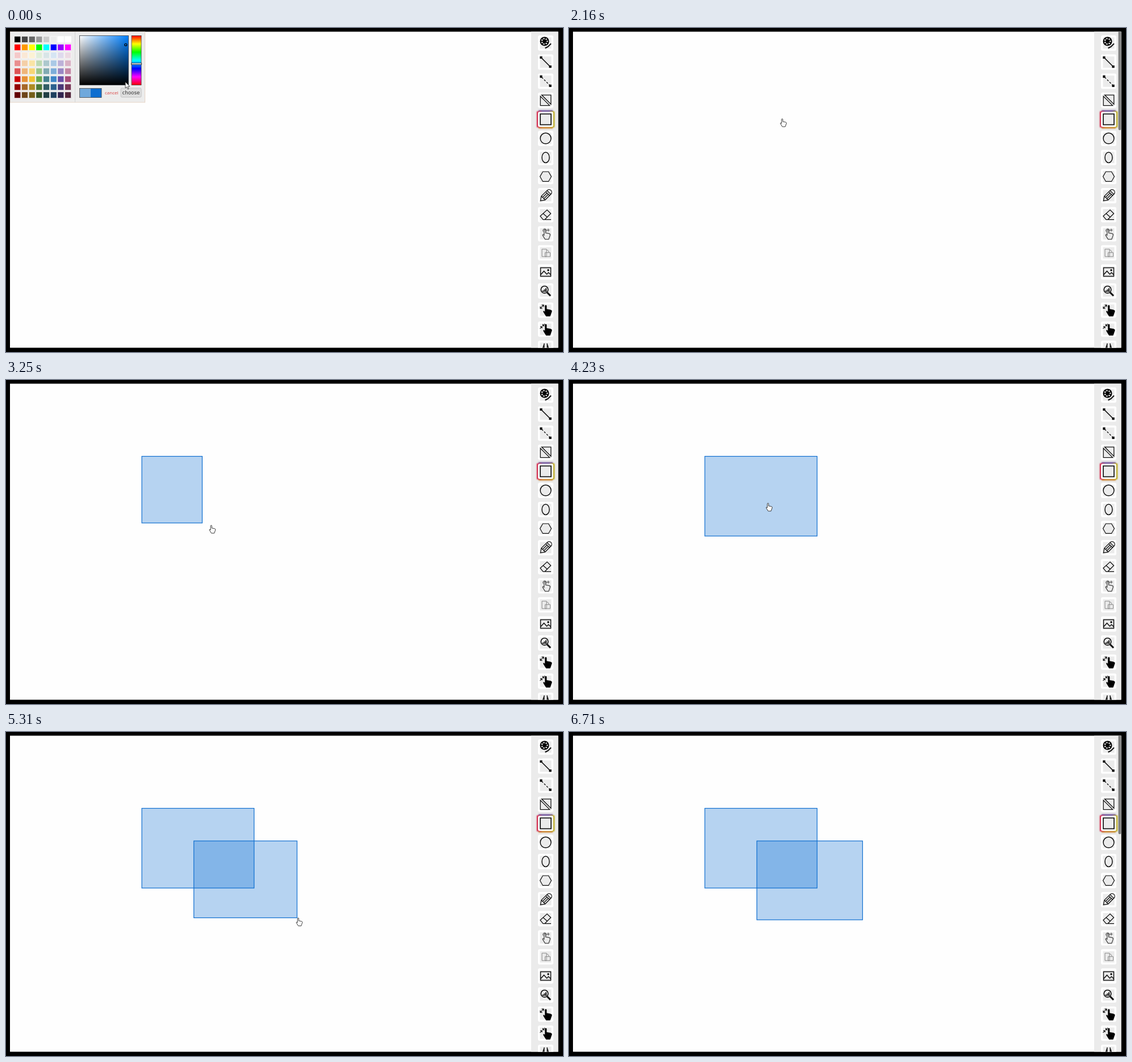
These frames come from a looping animation (980 px wide and 571 px high, 6980 ms). An HTML page:

```html
<!DOCTYPE html>
<html>
<head>
<meta charset="utf-8">
<style>
html, body { margin: 0; width: 100%; height: 100%; overflow: hidden; background: #000; }
svg { display: block; }
.icon { fill: none; stroke: #111; stroke-width: 1.5; }
.icon .solid { fill: #000; stroke: none; }
.icon .light { fill: #ebebeb; stroke: none; }
.icon .thin { stroke-width: 1; stroke: #444; }
.icon .pale { stroke-width: 1; stroke: #888; }
.shape { fill-opacity: .3; fill: rgb(14,110,208); stroke: rgb(14,110,208); stroke-width: 1.2; }
.glow rect { filter: blur(1.3px); }
.frame { fill: none; stroke: #444; stroke-width: .8; }
</style>
</head>
<body>
<svg width="980" height="571" viewBox="0 0 980 571">
  <defs>
    <linearGradient id="white"><stop stop-color="#fff"/><stop offset="1" stop-color="#fff" stop-opacity="0"/></linearGradient>
    <linearGradient id="black" x2="0" y2="1"><stop stop-opacity="0"/><stop offset="1"/></linearGradient>
    <linearGradient id="hue" x2="0" y2="1"></linearGradient>
    <clipPath id="view"><rect x="7" y="6.5" width="964.5" height="557"/></clipPath>
  </defs>
  <g clip-path="url(#view)">
    <rect width="980" height="571" fill="#fefefe"/>
    <rect id="first" class="shape"/>
    <rect id="second" class="shape"/>
    <rect x="924" width="56" height="571" fill="#ebebeb"/>
    <g class="glow">
      <rect x="937" y="145" width="25" height="8" fill="#604090"/>
      <rect x="937" y="169" width="25" height="8" fill="#c87818"/>
      <rect x="934" y="147" width="8" height="28" fill="#d00830"/>
      <rect x="957" y="147" width="8" height="28" fill="#b4a000"/>
    </g>
    <g id="tools"></g>
    <rect id="bar" x="966.5" y="0" width="5" height="180" rx="2.5" fill="#808080"/>
    <g id="picker">
      <rect x="7" y="6.5" width="237.5" height="124.5" fill="#ececec" stroke="#e6d4c6"/>
      <path d="M121.5 7V131" stroke="#d4d4d4"/>
      <g id="swatches" stroke="#fff" stroke-width=".6"></g>
      <rect x="129.5" y="13.5" width="86" height="87" fill="hsl(210,100%,50%)"/>
      <rect x="129.5" y="13.5" width="86" height="87" fill="url(#white)"/>
      <rect x="129.5" y="13.5" width="86" height="87" fill="url(#black)"/>
      <rect x="129.5" y="13.5" width="86" height="87" class="frame"/>
      <circle cx="210.7" cy="29.5" r="2" fill="none" stroke="#000" stroke-width="1.2"/>
      <rect x="221" y="13.5" width="17" height="87" fill="url(#hue)"/>
      <rect x="221" y="13.5" width="17" height="87" class="frame"/>
      <rect x="220.5" y="62" width="18" height="2.4" fill="#fff" stroke="#111" stroke-width=".8"/>
      <rect x="130" y="106.5" width="19" height="16" fill="#6fa8dc"/>
      <rect x="149" y="106.5" width="19" height="16" fill="#0e6ed0"/>
      <rect x="129.5" y="106.5" width="38.5" height="16" class="frame"/>
      <text x="174" y="117" font-family="Open Sans, sans-serif" font-size="8" fill="#d93f3f">cancel</text>
      <rect x="202" y="106" width="36" height="16" rx="2" fill="#dedede" stroke="#bbb" stroke-width=".8"/>
      <text x="204.5" y="116.7" font-family="DejaVu Sans, sans-serif" font-size="8.7" fill="#333">choose</text>
    </g>
    <g id="cursor" fill="#fff" stroke="#222" stroke-linejoin="round">
      <path id="arrow" d="M0 0V11l2.5-2.3 1.8 4.2 1.8-.8-1.8-4h3.5z" stroke-width=".8"/>
      <path id="hand" stroke-width=".9"/>
    </g>
  </g>
</svg>
<script>
const el = id => document.getElementById(id);
const path = (d, cls = "", extra = "") => `<path class="${cls}" d="${d}" ${extra}/>`;
const handShape = "M-3-5.7q0-1.2 1.1-1.2t1.1 1.2V-2l4.4.8q2 .4 2 2L4.5 4 3.4 7H-1.6L-4.8 1.8q-.8-1.8.7-1.5l1.1.9z";
const hand = (scale, x, cls) => `<g transform="translate(${x} 1) scale(${scale})">${path(handShape, cls)}</g>`;

// Swatches: greys, pure hues, then muted bases from pale tints to dark shades.
const greys = [0, 27, 40, 60, 80, 93, 100, 100].map(l => `hsl(0,0%,${l}%)`);
const pure = [0, 36, 60, 120, 180, 240, 276, 300].map(h => `hsl(${h},100%,50%)`);
const muted = "#c00 #e69138 #f1c232 #6aa84f #45818e #3d85c6 #674ea7 #a64d79".split(" ");
const mixes = ["white 79%", "white 56%", "white 33%", "white 0%", "black 28%", "black 52%"];
const rows = [greys, pure, ...mixes.map(m => muted.map(c => `color-mix(in srgb, ${c}, ${m})`))];
el("swatches").innerHTML = rows.map((row, r) => row.map((c, i) =>
  `<rect x="${14.8 + i * 12.68}" y="${14.8 + r * 14}" width="11" height="10.8" style="fill:${c}"/>`).join("")).join("");

el("hue").innerHTML = Array.from({ length: 7 }, (_, i) =>
  `<stop offset="${i / 6}" stop-color="hsl(${i * 60},100%,50%)"/>`).join("");

const ends = path("M-10.2-10.2h4.2v4.2h-4.2zM6 6h4.2v4.2h-4.2z", "solid");
const dots = Array.from({ length: 7 }, (_, i) => {
  const a = i * Math.PI / 3.5;
  return `<circle class="light" cx="${-2 + 4.8 * Math.cos(a)}" cy="${-3 + 4.8 * Math.sin(a)}" r="1.3"/>`;
}).join("");
const bars = [2.5, 4.5, 6.5].map((h, i) =>
  `<rect class="solid" x="${-5.5 + i * 2.6}" y="${1.5 - h}" width="1.8" height="${h}"/>`).join("");

const icons = [
  '<circle class="solid" cx="-2" cy="-3" r="8"/>' + dots + path("M9.5 1L4 6.5M4 6.5L-1 9", "", 'stroke-width="2"'),
  path("M-8-8L8 8") + ends,
  path("M-7-7L8 8", "", 'stroke-width="1.3" stroke-dasharray="3.5 2.5"') + ends,
  path("M-7-9.3H9.3V7zM-9.3-7V9.3H7z", "", 'stroke-width="1.3"'),
  '<rect x="-9.5" y="-9.5" width="19" height="19" stroke-width="1.7"/>',
  '<circle r="9.5"/>',
  '<ellipse rx="6.5" ry="9.3"/>',
  path("M-10 0L-5-8.6H5L10 0 5 8.6H-5z", "", 'stroke-width="1.2"'),
  '<g transform="rotate(-45)" stroke-width="1.3">' +
    path("M-13 0L-6-4.7H8.5a4.7 4.7 0 0 1 0 9.4H-6zM-6-4.7V4.7M-6-1.6H5M-6 1.6H5M5-4.7V4.7M8-4.7V4.7") + "</g>",
  path("M-9.5 2.5L2.5-8.5 9-2-1.5 8.5H-4.5zM-4.5-2L3 4.3M-2 8.5H9.5", "", 'stroke-width="1.3"'),
  hand(1.25, 1, "thin") + path("M4.5-9v5M2-6.5h5M-4.5-4a3.2 3.2 0 1 1 5.5 0", "thin"),
  path("M-6.5-6.5H1.5V6.5H-6.5zM-1-.5H8V6.5H-1zM1.5-5q4 0 4 4.5", "pale"),
  path("M-9-7.5H9V7.5H-9zM-9 5L-3-1.5 2 4 5 1 9 5") + '<circle class="solid" cx="4.5" cy="-3.2" r="1.7"/>',
  '<circle cx="-2" cy="-2.5" r="6.3" stroke-width="1.7"/>' + bars + path("M2.5 2.5L8.5 8.5", "", 'stroke-width="3"'),
  hand(1.45, 3, "solid") + path("M-9.5-3L-3.5-9M-9.5-6.5V-3H-6M-7-9h3.5v3.5", "", 'stroke-width="1.2"'),
  hand(1.45, 3, "solid") + path("M-10-1L-6.5-4.5M-9.5-4.5h3v3M-1.5-9.5L-5-6M-5-9v3h3", "", 'stroke-width="1.2"'),
  path("M-2.5-8.5V8H-8zM2.5-8.5V8H8z", "", 'fill="#222" stroke-width="1"')];

el("tools").innerHTML = icons.map((icon, i) =>
  `<g class="icon" transform="translate(949.5 ${26.5 + i * 33.62})">
    <rect x="-13.5" y="-13.5" width="27" height="27" rx="3" style="fill:#fff;stroke:none"/>
    <rect class="light" x="-10" y="-10" width="20" height="20"/>${icon}</g>`).join("");
el("hand").setAttribute("d", handShape);

// Turning points of the pointer: time, x, y.
const stops = [[0, 210, 95], [280, 220, 114], [425, 221, 115], [966, 870, 209], [1400, 946, 163], [1600, 946, 163],
  [2190, 377, 167], [2580, 196, 138], [2850, 242.5, 141.5], [3000, 275, 238], [3278, 363, 263], [3670, 440, 282],
  [4230, 352, 224], [4490, 334, 199], [4890, 486, 321], [5200, 515, 334], [5850, 520, 338], [6650, 955, 590]];

function pointer(t) {
  const i = stops.findIndex(s => s[0] > t);
  if (i < 0) return stops[stops.length - 1].slice(1);
  const [t0, x0, y0] = stops[i - 1], [t1, x1, y1] = stops[i];
  const k = (t - t0) / (t1 - t0);
  return [x0 + (x1 - x0) * k, y0 + (y1 - y0) * k];
}

const show = (id, on) => el(id).style.display = on ? "" : "none";

// A dragged rectangle: its free corner trails the pointer a little.
function drag(id, start, end, t) {
  const lag = 45;
  const [x, y] = pointer(start);
  const [right, bottom] = pointer(Math.min(Math.max(t - lag, start), end));
  const box = { x: x - 3.5, y: y - 7, width: right - x, height: bottom - y };
  for (const key in box) el(id).setAttribute(key, box[key]);
  show(id, t > start + lag);
}

const loop = 6980, tick = 136;

function frame() {
  const now = (performance.now() - begin) % loop;
  const t = Math.max(0, 150 + Math.floor((now - 120) / tick) * tick);
  show("picker", t < 420);
  show("arrow", t < 280);
  show("hand", t >= 280);
  show("bar", t > 1350 && t < 2300 || t > 6500);
  drag("first", 2850, 3670, t);
  drag("second", 4490, 5850, t);
  el("cursor").setAttribute("transform", `translate(${now < 120 ? pointer(0) : pointer(t)})`);
  requestAnimationFrame(frame);
}
const begin = performance.now();
frame();
</script>
</body>
</html>
```
